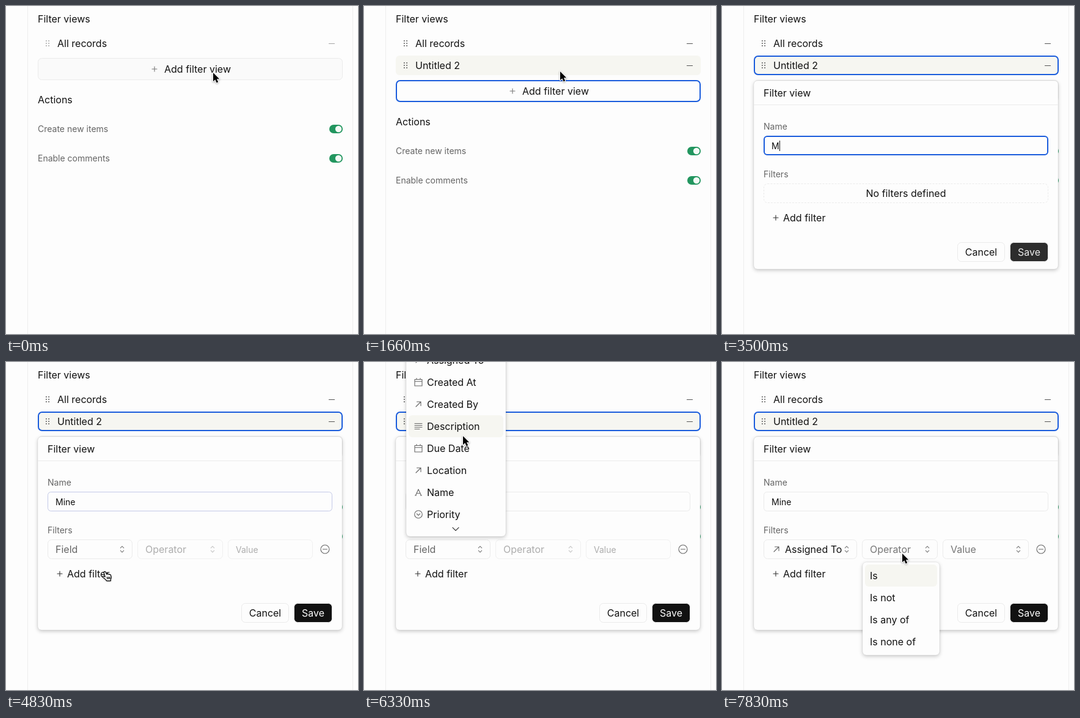
Animation of 576 by 536 pixels, one loop 8000 ms. Source, as an HTML page with a canvas:

```html
<!DOCTYPE html>
<html lang="en">
<head>
<meta charset="utf-8">
<title>Filter views</title>
<style>
  html, body { margin: 0; width: 100%; height: 100%; overflow: hidden; background: #fdfdfd; }
  canvas { display: block; }
</style>
</head>
<body>
<canvas id="stage" width="576" height="536"></canvas>
<script>
const ctx = document.getElementById('stage').getContext('2d');
const LOOP = 8000, STEP = 1000 / 6;
const INK = '#111', GRAY = '#656565', PALE = '#adadad', LINE = '#ebebeb';
const PAPER = '#fdfdfd', HOVER = '#f6f6f1', BLUE = '#1a5cdc', GREEN = '#22965f';

// Moments (ms) at which the interface changes
const AT = { addRow: 990, openView: 1990, type: 3490, addFilter: 4820, openFields: 5320,
             pickField: 6990, openOperators: 7650 };

// Pointer path: time, x, y
const PATH = [
  [0, 339, 109], [333, 339, 109], [833, 334, 104], [1167, 332, 104], [1667, 321, 107],
  [2000, 307, 99], [2333, 306, 99], [2833, 230, 330], [4000, 230, 330], [4667, 164, 343],
  [4833, 162, 343], [5167, 150, 314], [5333, 148, 312], [5667, 148, 312], [6000, 162, 125],
  [6333, 162, 121], [6667, 146, 8], [6833, 144, 6], [7500, 294, 311], [7667, 295, 313], [8000, 295, 313]
];

function pointerAt(t) {
  const i = Math.max(1, PATH.findIndex(p => p[0] >= t));
  const [t0, x0, y0] = PATH[i - 1], [t1, x1, y1] = PATH[i];
  const k = (t - t0) / (t1 - t0), ease = k * k * (3 - 2 * k);
  return { x: x0 + (x1 - x0) * ease, y: y0 + (y1 - y0) * ease };
}

function text(label, x, y, color = INK, size = 16, align = 'left') {
  ctx.font = `${size}px Inter, sans-serif`;
  ctx.textAlign = align;
  ctx.fillStyle = color;
  ctx.fillText(label, x, y + Math.round(size * 0.364));
}

function box(x, y, w, h, { fill, stroke, width = 1, radius = 6, dash = [] }) {
  const inset = stroke ? width / 2 : 0;
  ctx.beginPath();
  ctx.roundRect(x + inset, y + inset, w - 2 * inset, h - 2 * inset, radius);
  if (fill) { ctx.fillStyle = fill; ctx.fill(); }
  if (!stroke) return;
  ctx.setLineDash(dash);
  ctx.strokeStyle = stroke;
  ctx.lineWidth = width;
  ctx.stroke();
  ctx.setLineDash([]);
}

function floating(x, y, w, h) {
  ctx.save();
  ctx.shadowColor = 'rgba(0,0,0,.22)';
  ctx.shadowBlur = 6;
  ctx.shadowOffsetY = 2;
  box(x, y, w, h, { fill: PAPER });
  ctx.restore();
  box(x - .5, y - .5, w + 1, h + 1, { stroke: 'rgba(0,0,0,.06)' });
}

// Line drawing with its path relative to x, y
function icon(path, x, y, color = '#666', width = 1.1) {
  ctx.save();
  ctx.translate(x, y);
  ctx.strokeStyle = color;
  ctx.lineWidth = width;
  ctx.lineCap = ctx.lineJoin = 'round';
  ctx.stroke(new Path2D(path));
  ctx.restore();
}

const ICONS = {
  plus: 'M-4 0H4M0-4V4',
  minus: 'M-4.5 0H4.5',
  removal: 'M-7 0a7 7 0 1 0 14 0a7 7 0 1 0-14 0M-3.5 0H3.5',
  sort: 'M-2.7-2.2L0-4.8L2.7-2.2M-2.7 2.2L0 4.8L2.7 2.2',
  down: 'M-5-2.5L0 2.5L5-2.5',
  link: 'M-4 4L4-4M-2.5-4H4V2.5',
  date: 'M-6-4.5H6V6H-6ZM-6-1.2H6M-3-6.5V-4.5M3-6.5V-4.5',
  lines: 'M-6-4.5H6M-6-1.5H6M-6 1.5H6M-6 4.5H2',
  letter: 'M-4.5 5L0-5L4.5 5M-3 1.8H3M-5.5 5H-3.5M3.5 5H5.5',
  choice: 'M-6.3 0a6.3 6.3 0 1 0 12.6 0a6.3 6.3 0 1 0-12.6 0M-2.6-1L0 1.6L2.6-1'
};
const FIELDS = [['Assigned To', 'link'], ['Created At', 'date'], ['Created By', 'link'],
  ['Description', 'lines'], ['Due Date', 'date'], ['Location', 'link'], ['Name', 'letter'], ['Priority', 'choice']];
const OPERATORS = ['Is', 'Is not', 'Is any of', 'Is none of'];

function viewRow(label, y, color) {
  ctx.fillStyle = color;
  for (const dx of [65.9, 70.1])
    for (const dy of [-4, 0, 4]) {
      ctx.beginPath();
      ctx.arc(dx, y + dy, .95, 0, 7);
      ctx.fill();
    }
  text(label, 84, y);
  icon(ICONS.minus, 533, y + .5, color, 1.2);
}

function toggleRow(label, y) {
  text(label, 52, y, GRAY, 14);
  box(529, y - 7, 22, 14, { fill: GREEN, radius: 7 });
  ctx.fillStyle = '#f4faf6';
  ctx.beginPath();
  ctx.arc(544, y, 5.2, 0, 7);
  ctx.fill();
}

function select(label, x, w, color, border = LINE, textX = x + 13) {
  box(x, 290, w, 32, { stroke: border });
  text(label, textX, 306, color);
  icon(ICONS.sort, x + w - 17, 306, color === PALE ? '#c4c4c4' : '#777');
}

function settings(t, pointer) {
  ctx.fillStyle = '#ededed';
  ctx.fillRect(35, 0, 1, 536);
  ctx.fillRect(567, 0, 1, 536);
  text('Filter views', 52, 21);

  const added = t >= AT.addRow, viewOpen = t >= AT.openView, shift = added ? 36 : 0;
  if (added) {
    const hovered = viewOpen || pointer.y < 113;
    box(52, 81, 499, 32, { fill: hovered ? HOVER : PAPER, stroke: viewOpen && BLUE, width: 2 });
    viewRow('Untitled 2', 97, '#555');
  }
  viewRow('All records', 61, added ? '#555' : '#a5a5a5');

  box(52, 85 + shift, 499, 36, added && !viewOpen
    ? { fill: PAPER, stroke: BLUE, width: 2 }
    : { fill: added ? PAPER : '#fafafa', stroke: LINE });
  icon(ICONS.plus, 243, 103 + shift, '#777');
  text('Add filter view', 259, 103 + shift);
  text('Actions', 52, 153 + shift);
  toggleRow('Create new items', 201 + shift);
  toggleRow('Enable comments', 249 + shift);
}

function nameInput(t) {
  const typed = t >= AT.type, blurring = t >= AT.addFilter;
  const border = !blurring ? BLUE : t < AT.addFilter + 160 ? '#c3c9e8' : LINE;
  box(68, 212, 466, 32, { fill: PAPER, stroke: border, width: blurring ? 1 : 2, radius: 5 });
  if (!typed) {
    ctx.fillStyle = '#f9ceb3';
    ctx.fillRect(81, 220, 65, 18);
  }
  const value = !typed ? 'Untitled 2' : 'Mine'.slice(0, [1, 3][Math.floor((t - AT.type) / STEP)]);
  text(value, 81, 229, INK, 14);
  if (typed && !blurring) {
    ctx.fillStyle = INK;
    ctx.fillRect(Math.round(81 + ctx.measureText(value).width), 220, 1, 17);
  }
}

function filterRow(picked) {
  if (picked) {
    select('Assigned To', 68, 153, INK, LINE, 103);
    icon(ICONS.link, 89, 306);
    select('Operator', 229, 124, '#777');
    select('Value', 361, 141, '#777');
  } else {
    select('Field', 68, 139, GRAY);
    select('Operator', 215, 140, PALE, '#f0f0f0');
    box(363, 290, 139, 32, { stroke: '#f0f0f0' });
    text('Value', 376, 307, PALE, 14);
  }
  icon(ICONS.removal, 522, 306, '#666');
}

function viewEditor(t) {
  const filtered = t >= AT.addFilter, grow = filtered ? 8 : 0;
  floating(52, 122, 498, 308 + grow);
  text('Filter view', 68, 142);
  ctx.fillStyle = LINE;
  ctx.fillRect(52, 161, 498, 1);
  text('Name', 68, 197, GRAY, 14);
  nameInput(t);
  text('Filters', 68, 275, GRAY, 14);
  if (filtered) filterRow(t >= AT.pickField);
  else {
    box(68, 290, 466, 32, { stroke: LINE, dash: [3, 2] });
    text('No filters defined', 301, 306, INK, 16, 'center');
  }
  icon(ICONS.plus, 88, 346, '#333');
  text('Add filter', 100, 346);

  box(385, 386 + grow, 78, 32, { fill: PAPER, stroke: LINE });
  text('Cancel', 424, 402 + grow, INK, 16, 'center');
  const [fill, color] = t < AT.type ? ['#f0f0ec', GRAY]
    : t < AT.type + 160 ? ['#2d2d2d', '#ededed'] : [INK, '#fcfcfc'];
  box(471, 386 + grow, 63, 32, { fill, stroke: t < AT.type ? '#e3e3e0' : LINE });
  text('Save', 502.5, 402 + grow, color, 16, 'center');
}

function fieldMenu(pointer) {
  floating(69, -25, 163, 310);
  const over = Math.floor((pointer.y + 2 + 21) / 36);
  const active = pointer.y < 285 ? over : 0;
  FIELDS.forEach(([label, kind], i) => {
    const y = 36 * i - 3;
    if (i === active) box(73, y - 18, 155, 36, { fill: HOVER });
    icon(ICONS[kind], 89, y);
    text(label, 103, y);
  });
  icon(ICONS.down, 150, 273, '#444');
}

function operatorMenu() {
  floating(230, 327, 126, 152);
  box(234, 331, 118, 36, { fill: HOVER });
  OPERATORS.forEach((label, i) => text(label, 242, 349 + 36 * i));
}

const ARROW = new Path2D('M0 0V14.2L3.3 11.2L5.6 16.4L8.2 15.3L5.9 10.2H10.2Z');
const HAND = new Path2D('M-1.8 1.2C-2.4-.4 .2-1.2 .9 .3L2.6 4C3 2.9 4.6 2.9 5 4C5.6 3.2 7 3.4 7.3 4.5' +
  'C8 4 9.2 4.4 9.5 5.6C10.3 8 10.6 10 9.2 12L9.3 14.6H2.6C1.6 12.4-1 11-3.2 8.8C-4.4 7.4-2.8 6.2-1.6 7.2L.2 8.2Z');

function drawPointer({ x, y }, hand) {
  ctx.save();
  ctx.translate(x, y);
  ctx.lineJoin = 'round';
  ctx.shadowColor = 'rgba(0,0,0,.35)';
  ctx.shadowBlur = 3;
  ctx.shadowOffsetY = 1;
  if (hand) {
    ctx.fillStyle = '#fff';
    ctx.fill(HAND);
    ctx.shadowColor = 'transparent';
    ctx.strokeStyle = '#000';
    ctx.lineWidth = 1.2;
    ctx.stroke(HAND);
    ctx.stroke(new Path2D('M3.2 8.2L4 11.8M5.4 8L6 11.8M7.5 8L7.8 11.6'));
  } else {
    ctx.strokeStyle = '#fff';
    ctx.lineWidth = 2;
    ctx.stroke(ARROW);
    ctx.shadowColor = 'transparent';
    ctx.fillStyle = '#000';
    ctx.fill(ARROW);
  }
  ctx.restore();
}

// Layers that open are half transparent during their first step
function fadeIn(t, start, draw) {
  if (t < start) return;
  ctx.save();
  ctx.globalAlpha = t < start + 160 ? .6 : 1;
  draw();
  ctx.restore();
}

function render() {
  // The picture advances six times a second
  const t = Math.floor((performance.now() % LOOP + 10) / STEP) * STEP % LOOP;
  const pointer = pointerAt(t);
  ctx.fillStyle = PAPER;
  ctx.fillRect(0, 0, 576, 536);
  settings(t, pointer);
  fadeIn(t, AT.openView, () => viewEditor(t));
  if (t < AT.pickField) fadeIn(t, AT.openFields, () => fieldMenu(pointer));
  fadeIn(t, AT.openOperators, operatorMenu);
  if (t < AT.type || t >= 4150) drawPointer(pointer, t > 4600 && t < 4950);
  requestAnimationFrame(render);
}
render();
</script>
</body>
</html>
```
